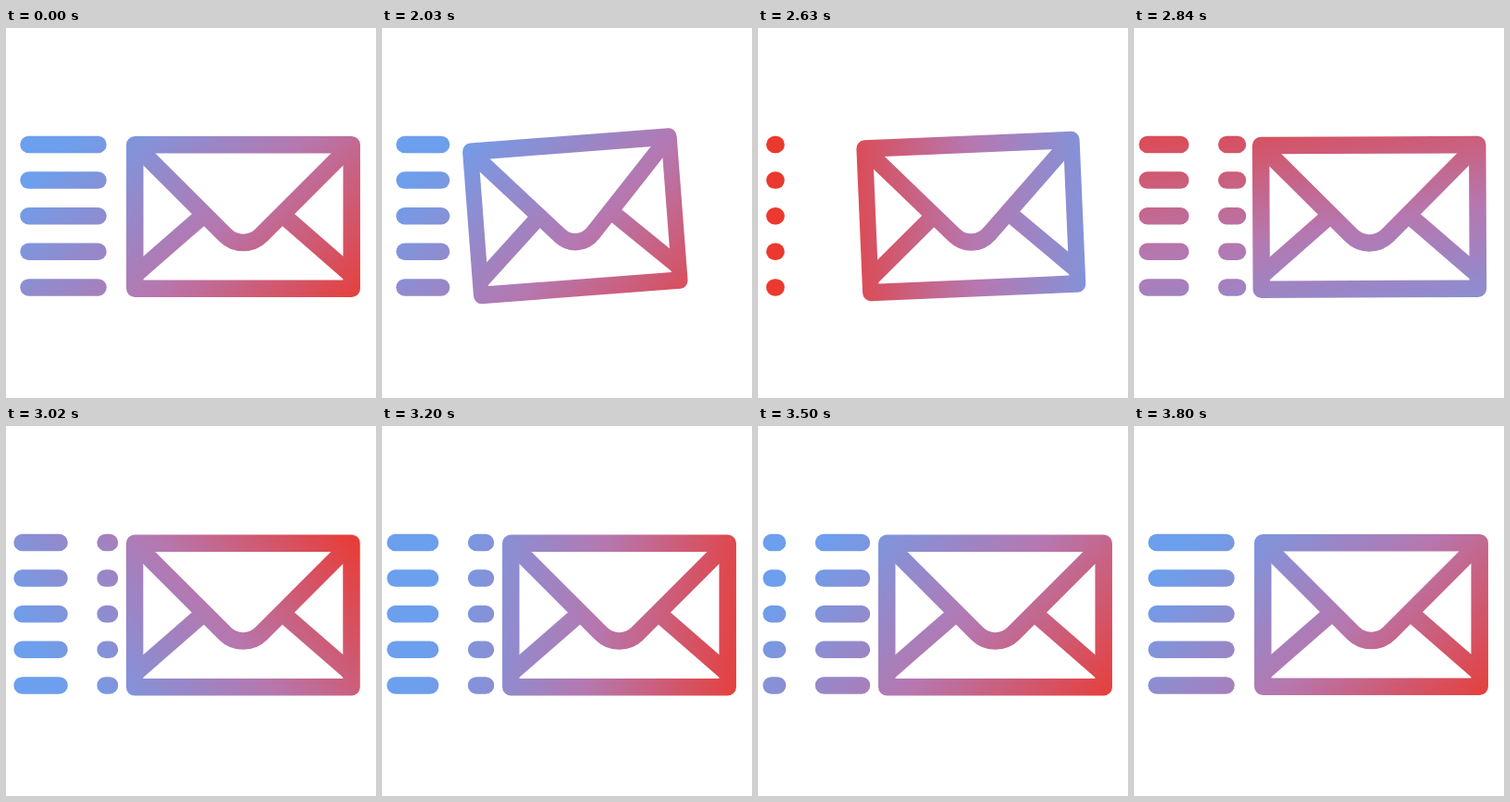
Recreate the animation shown at these times as an HTML page without scripts. Size 400 by 400 pixels, loop 3830 ms.

```html
<!DOCTYPE html>
<html lang="en">
<head>
<meta charset="utf-8">
<title>Sending mail</title>
<style>
  html, body { margin: 0; width: 100%; height: 100%; overflow: hidden; background: #fff; }
  svg { display: block; width: 100%; height: 100%; }

  .mail, .trail path { fill: none; stroke: #fff; stroke-width: 18.5; }
  .mail { stroke-linejoin: round; transform-origin: 256.5px 204px; animation: launch 3830ms linear infinite; }
  .trail path {
    d: path("M24.5 0H99.5");
    stroke-linecap: round;
    stroke-dasharray: 40 50 40 50 40 50 40 50 400 0;
    animation: stretch 3830ms linear infinite, flow 3830ms linear infinite;
  }
  .hue { animation: spin 3830ms linear infinite; }

  /* pull back and tilt, then shoot forward */
  @keyframes launch {
    0%, 52.95% { transform: translate(0, 0) rotate(0deg) scale(1, 1); }
    52.96% {
      transform: translate(-45.5px, -.8px) rotate(-4.15deg) scale(.922, 1);
      animation-timing-function: cubic-bezier(.1, .6, .3, 1);
    }
    64%, 66.06% {
      transform: translate(-106px, -.5px) rotate(-10.2deg) scale(.817, 1);
      animation-timing-function: cubic-bezier(.3, 0, .7, .85);
    }
    68.67% {
      transform: translate(-26.5px, -.5px) rotate(-2.5deg) scale(.954, 1);
      animation-timing-function: cubic-bezier(.15, .5, .4, .95);
    }
    74.15% {
      transform: translate(-2px, .4px) rotate(-.25deg) scale(.999, 1);
      animation-timing-function: ease-out;
    }
    80.4%, 95.3% { transform: translate(0, .5px) rotate(0deg) scale(1, 1); }
    99.2%, 100% { transform: translate(0, 0) rotate(0deg) scale(1, 1); }
  }

  @keyframes stretch {
    0%, 52.95% { d: path("M24.5 0H99.5"); }
    52.96% {
      d: path("M24.5 0H65.5");
      animation-timing-function: cubic-bezier(.1, .6, .3, 1);
    }
    64%, 66.06% { d: path("M24.5 0H24.6"); }
    68.67% {
      d: path("M18.2 0H18.3");
      animation-timing-function: cubic-bezier(.2, .5, .4, 1);
    }
    73.5%, 94.6% {
      d: path("M14.5 0H112");
      animation-timing-function: ease-out;
    }
    99.2%, 100% { d: path("M24.5 0H99.5"); }
  }

  @keyframes flow {
    0%, 68.5% { stroke-dashoffset: 365; }
    68.51% { stroke-dashoffset: 0; }
    74.15% {
      stroke-dashoffset: 4;
      animation-timing-function: cubic-bezier(.3, .15, .7, .75);
    }
    83.55% { stroke-dashoffset: 182; }
    91.38% { stroke-dashoffset: 303; }
    95.3%, 100% { stroke-dashoffset: 365; }
  }

  @keyframes spin {
    0%, 52.22% {
      transform: rotate(45deg);
      animation-timing-function: cubic-bezier(.4, 0, .5, 1);
    }
    94.5%, 100% { transform: rotate(405deg); }
  }
</style>
</head>
<body>
<svg viewBox="0 0 400 400">
  <defs>
    <linearGradient id="fade" gradientUnits="userSpaceOnUse" x1="-180" y1="0" x2="180" y2="0">
      <stop offset="0" stop-color="#6c9fed"/>
      <stop offset=".5" stop-color="#b677af"/>
      <stop offset="1" stop-color="#eb392f"/>
    </linearGradient>
    <mask id="shape" maskUnits="userSpaceOnUse" x="0" y="0" width="400" height="400">
      <g class="trail">
        <g transform="translate(0 126)"><path/></g>
        <g transform="translate(0 164.6)"><path/></g>
        <g transform="translate(0 203.2)"><path/></g>
        <g transform="translate(0 241.8)"><path/></g>
        <g transform="translate(0 280.4)"><path/></g>
      </g>
      <g class="mail">
        <path d="M139.3 126.2H373.7V281.8H139.3Z"/>
        <path d="M139.5 126.5L236.9 223.9A27.8 27.8 0 0 0 276.1 223.9L373.5 126.5"/>
        <path d="M140 266.4L212 203.7M373 266.4L301 203.7"/>
      </g>
    </mask>
  </defs>
  <g mask="url(#shape)">
    <g transform="translate(232 212)">
      <rect class="hue" x="-400" y="-400" width="800" height="800" fill="url(#fade)"/>
    </g>
  </g>
</svg>
</body>
</html>
```
